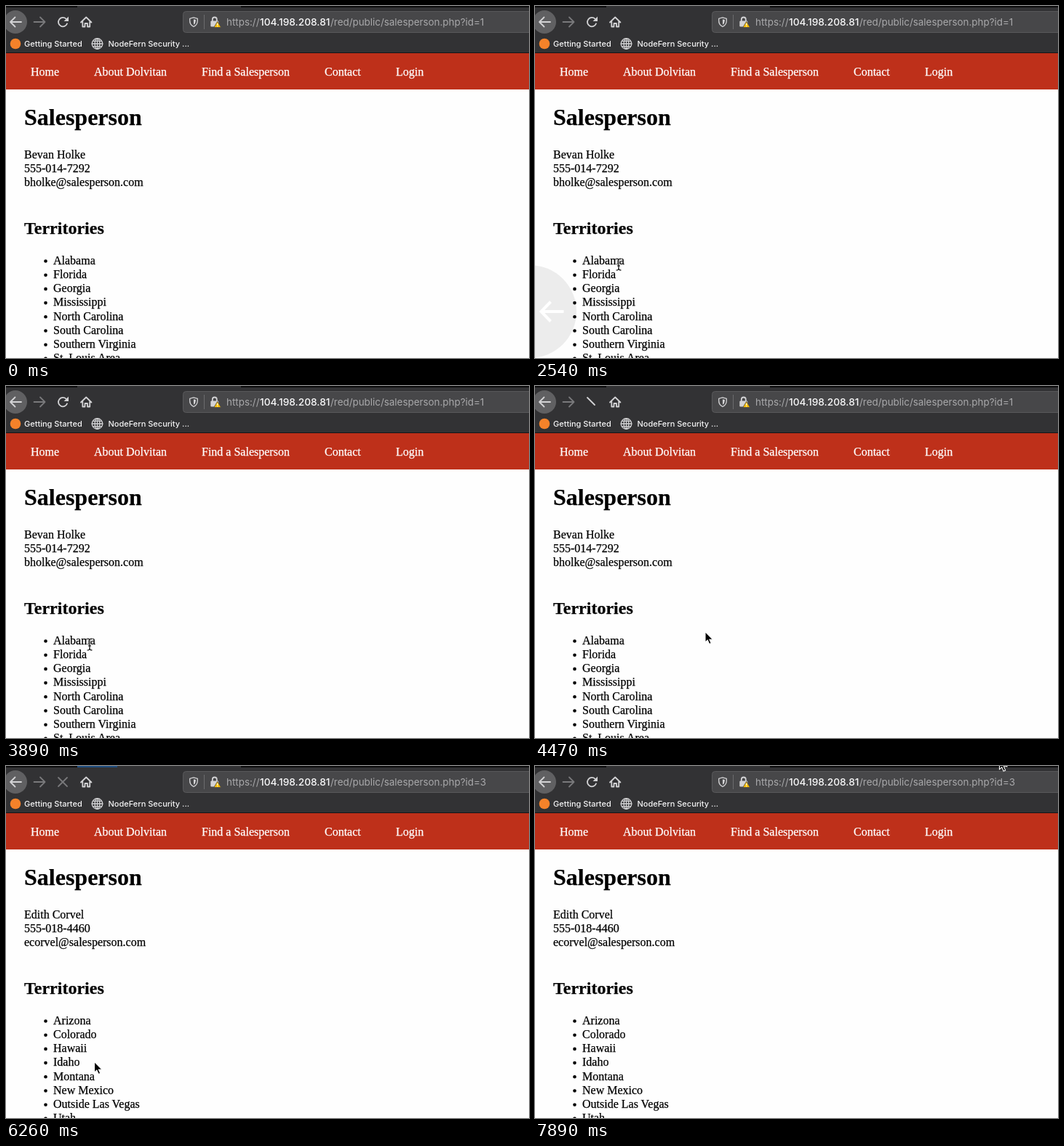
These frames come from a looping animation (719 by 485 pixels, 8 s). An HTML page:

```html
<!DOCTYPE html>
<html lang="en">
<head>
<meta charset="utf-8">
<title>Salesperson lookup</title>
<style>
html, body { margin: 0; width: 100%; height: 100%; overflow: hidden; background: #fefefe; }
svg { display: block; width: 719px; height: 485px; }
text { font: 16px "Liberation Serif", "Times New Roman", serif; fill: #000; white-space: pre; }
#pages text { stroke: #000; stroke-width: .25; }
#pages .link { fill: #0000ee; stroke: #0000ee; text-decoration: underline; }
.ui { font: 500 11px Inter, Roboto, sans-serif; fill: #f4f4f5; }
.url { font: 13.4px Inter, Roboto, sans-serif; fill: #a9a9ab; }
.host { font-size: 13.7px; font-weight: 500; fill: #f9f9fa; }
.nav { fill: #fff; stroke: #fff; stroke-width: .25; }
.h1 { font-size: 32px; font-weight: bold; }
.h2 { font-size: 24px; font-weight: bold; }
.b { font-weight: bold; }
.icon { fill: none; stroke: #d3d3d5; stroke-width: 1.8; stroke-linecap: round; stroke-linejoin: round; }
.thin { stroke-width: 1.3; }
.dim { stroke: #79797b; }
</style>
</head>
<body>
<svg viewBox="0 0 719 485">
  <rect width="719" height="485" fill="#fefefe"/>
  <g id="pages"></g>

  <rect width="719" height="65" fill="#323234"/>
  <path d="M0 0H98V2H0zM323 0H719V2H323z" fill="#0c0c0d"/>
  <rect id="busy" x="98" width="55" height="2" fill="#1f4d80"/>
  <rect y="64" width="719" height="1" fill="#161617"/>

  <circle cx="13" cy="22" r="16" fill="#606062"/>
  <path class="icon" d="M21 22H6M12.5 15.5L6 22L12.5 28.5"/>
  <path id="forward" class="icon" d="M38.5 22H53.5M47 15.5L53.5 22L47 28.5"/>
  <g id="reload">
    <path class="icon" d="M84 24.3A6.2 6.2 0 1 1 82.5 17.6"/>
    <path d="M86 14.6V21H79.6z" fill="#d3d3d5"/>
  </g>
  <path id="slash" class="icon" d="M72 16L82 26"/>
  <path id="stop" class="icon" d="M72 16L84 28M84 16L72 28"/>
  <path class="icon" d="M103 22.5L110.2 15.5L117.4 22.5M105.3 21.5V28.5H108.5V24H112V28.5H115.2V21.5"/>

  <rect x="243.5" y="7.5" width="490" height="29" rx="4" fill="#474749" stroke="#59595b"/>
  <path class="icon thin" d="M258 15.8L263.3 17.3V20.5Q263.3 25.8 258 28.5Q252.7 25.8 252.7 20.5V17.3z"/>
  <path d="M258 18.2L260.8 19V20.6Q260.8 24 258 25.8z" fill="#d3d3d5"/>
  <path d="M272.5 12V32" stroke="#6b6b6d"/>
  <path class="icon" d="M283.8 21V18.5A3 3 0 0 1 289.8 18.5V21"/>
  <rect x="281.3" y="20.5" width="11" height="8" rx="1.2" fill="#d3d3d5"/>
  <path d="M290.7 21.3L295.6 29.6H285.8z" fill="#ffbf00" stroke="#474749" stroke-width=".8"/>
  <path d="M290.7 24V26.4M290.7 27.4V28.4" stroke="#fff" stroke-width="1.2"/>
  <text class="url" x="303" y="27">https://</text>
  <text class="url host" x="349" y="27">104.198.208.81</text>
  <text class="url" id="path" x="446" y="27"></text>

  <circle cx="13" cy="52" r="7.3" fill="#f5822a"/>
  <text class="ui" x="25" y="56">Getting Started</text>
  <g class="icon thin">
    <circle cx="125.5" cy="52" r="7.3"/>
    <ellipse cx="125.5" cy="52" rx="3.4" ry="7.3"/>
    <path d="M118.2 52H132.8M119.5 48.3H131.5M119.5 55.7H131.5M125.5 44.7V59.3"/>
  </g>
  <text class="ui" x="140.5" y="56">NodeFern Security ...</text>

  <rect y="65" width="719" height="50" fill="#be301a"/>
  <g id="nav"></g>

  <g id="swipe">
    <circle id="disc" cx="-7" cy="421" r="64"/>
    <path d="M39.5 421H9M21.5 407.5L8.5 421L21.5 434.5" fill="none" stroke="#fff" stroke-width="4"/>
  </g>

  <g id="cursor">
    <path id="arrow" d="M0 0V14.6L3.3 11.6L5.6 17L8.2 15.9L5.9 10.7H10.4z" fill="#000" stroke="#fff" stroke-width="1.1"/>
    <g id="beam" fill="none">
      <path d="M-3.5 -8Q0 -8 0 -5.5Q0 -8 3.5 -8M0 -6V6M-3.5 8Q0 8 0 5.5Q0 8 3.5 8M-2 2H2" stroke="#fff" stroke-width="2.6"/>
      <path d="M-3.5 -8Q0 -8 0 -5.5Q0 -8 3.5 -8M0 -6V6M-3.5 8Q0 8 0 5.5Q0 8 3.5 8M-2 2H2" stroke="#000" stroke-width="1.2"/>
    </g>
    <path id="hand" d="M-1.5 8V0Q0 -2 1.5 0V5Q3.4 4 4.4 5.6Q6.4 4.8 7.2 6.4Q9.6 6 9.6 8.4Q9.6 13 7.5 16H0Q-1 13 -5 9Q-5 6.5 -1.5 8z" fill="#fff" stroke="#000" stroke-width="1.1"/>
  </g>
</svg>
<script>
const LOOP = 8000;
const $ = id => document.getElementById(id);
const text = (x, y, s, cls = "") => `<text x="${x}" y="${y}" class="${cls}">${s}</text>`;
const show = (id, on) => { $(id).style.display = on ? "" : "none"; };

function salesperson(lines, areas) {
  return text(25, 164, "Salesperson", "h1") +
    lines.map((s, i) => text(25, 210 + 19.2 * i, s)).join("") +
    text(25, 313.5, "Territories", "h2") +
    areas.map((s, i) => {
      const y = 355.8 + 19.2 * i;
      return `<circle cx="54.5" cy="${y - 4.3}" r="2.3"/>` + text(65, y, s);
    }).join("");
}

function directory(entries) {
  return text(25, 164, "Find a Salesperson", "h1") +
    text(25, 210, "Use the list below to find a salesperson nearby. We are ready to serve you!") +
    text(25, 245, "UNITED STATES", "b") +
    entries.map(([state, name], i) => {
      const y = 280.6 + 54.4 * i;
      return text(25, y, state) +
        `<rect x="52" y="${y + 12.6}" width="5" height="5"/>` +
        text(65, y + 19.2, name, "link");
    }).join("");
}

const pages = [
  ["salesperson.php?id=1", salesperson(
    ["Bevan Holke", "555-014-7292", "bholke@salesperson.com"],
    ["Alabama", "Florida", "Georgia", "Mississippi", "North Carolina",
     "South Carolina", "Southern Virginia", "St. Louis Area"])],
  ["territories.php", directory([
    ["Alabama (AL)", "Bevan Holke"], ["Alaska (AK)", "Norman Fellrick"],
    ["Arizona (AZ)", "Edith Corvel"], ["Arkansas (AR)", "Josephine Urlen"]])],
  ["salesperson.php?id=3", salesperson(
    ["Edith Corvel", "555-018-4460", "ecorvel@salesperson.com"],
    ["Arizona", "Colorado", "Hawaii", "Idaho", "Montana",
     "New Mexico", "Outside Las Vegas", "Utah"])]
];
$("pages").innerHTML = pages.map(([, body], i) => `<g id="page${i}">${body}</g>`).join("");
$("nav").innerHTML = [[34, "Home"], [121, "About Dolvitan"], [269, "Find a Salesperson"],
  [438, "Contact"], [536, "Login"]].map(([x, s]) => text(x, 96, s, "nav")).join("");

// time, x, y, pointer shape
const track = [
  [150, 640, 12, "beam"], [300, 655, 30, "beam"], [450, 664, 52, "arrow"],
  [600, 669, 66, "arrow"], [750, 655, 48, "arrow"], [900, 660, 27, "beam"],
  [1050, 670, 14, "beam"], [1340, 604, 26, "beam"], [1490, 604, 26, "beam"],
  [1640, 460, 140, "arrow"], [1940, 76, 388, "beam"], [2240, 115, 356, "beam"],
  [3890, 115, 356, "beam"], [4030, 140, 351, "arrow"], [4470, 234, 338.5, "arrow"],
  [4920, 187, 348, "arrow"], [5370, 133.5, 364.5, "arrow"], [5520, 126, 400, "hand"],
  [5670, 121.5, 407.5, "hand"], [6110, 121.5, 407.5, "arrow"], [6260, 121.5, 407.5, "arrow"],
  [6850, 650, 52, "arrow"], [7150, 650, 52, "arrow"], [7450, 665, 34, "beam"],
  [7590, 650, 22, "beam"], [7740, 642, 10, "beam"], [7890, 638.5, -10, "arrow"]
];

// The screen refreshes every 150 ms, with a slightly short step before each of these times
const resync = [0, 1340, 4030, 4170, 5810, 6700, 7590];
function snap(t) {
  const base = resync.filter(r => r <= t).pop();
  return base + 150 * Math.floor((t - base) / 150);
}

function moveCursor(t) {
  const i = track.findLastIndex(k => k[0] <= t);
  show("cursor", i >= 0);
  if (i < 0) return;
  const a = track[i], b = track[i + 1] || a;
  const p = b === a ? 0 : (t - a[0]) / (b[0] - a[0]);
  const x = a[1] + (b[1] - a[1]) * p, y = a[2] + (b[2] - a[2]) * p;
  $("cursor").setAttribute("transform", `translate(${x} ${y})`);
  for (const shape of ["arrow", "beam", "hand"]) show(shape, shape === a[3]);
}

function draw(now) {
  const t = snap(now % LOOP);
  const page = t < 4620 ? 0 : t < 6110 ? 1 : 2;
  pages.forEach((_, i) => show("page" + i, i === page));
  $("path").textContent = "/red/public/" + pages[page][0];
  $("forward").classList.toggle("dim", page !== 1);

  const slash = t === 4470 || t === 5960;
  const stop = (t >= 4620 && t < 5220) || (t >= 6110 && t < 6560);
  show("slash", slash);
  show("stop", stop);
  show("reload", !slash && !stop);
  $("stop").classList.toggle("dim", t !== 4620 && t !== 6110);
  show("busy", t >= 6110 && t < 6410);

  show("swipe", t >= 2540 && t < 3890);
  $("disc").setAttribute("fill-opacity", 0.07 + 0.16 * Math.min(1, Math.max(0, (t - 2540) / 600)));
  moveCursor(t);
}

const start = performance.now();
function tick() {
  draw(performance.now() - start);
  requestAnimationFrame(tick);
}
tick();
</script>
</body>
</html>
```
